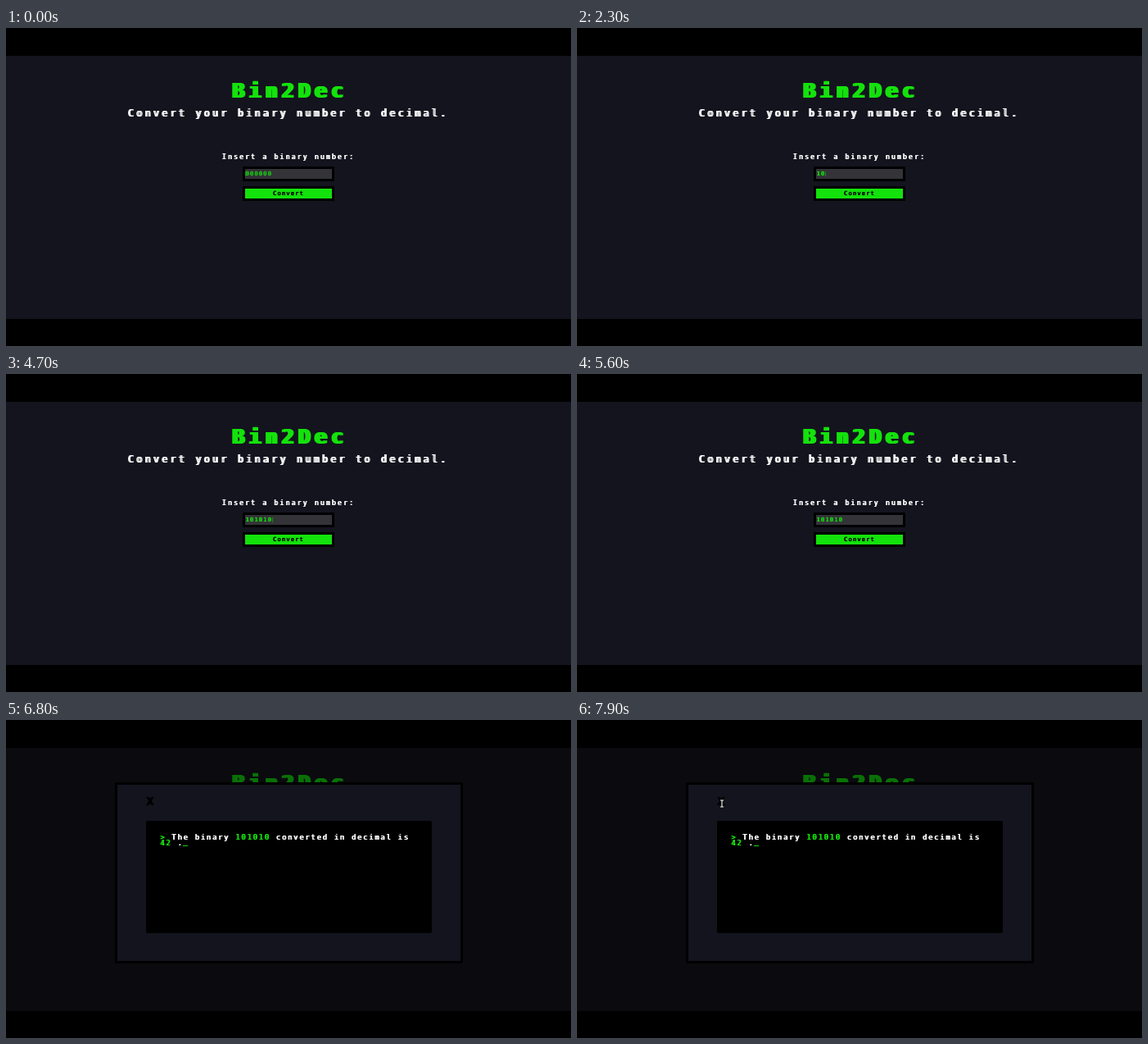
Write an HTML page that moves like this. It is 690 px wide and 388 px high and loops after 8000 ms.

```html
<!DOCTYPE html>
<html lang="en">
<head>
<meta charset="utf-8">
<title>Binary converter</title>
<style>
html, body { margin: 0; width: 100%; height: 100%; overflow: hidden; background: #000; }
#stage { position: relative; width: 690px; height: 388px; overflow: hidden; }
#stage div, svg { position: absolute; box-sizing: border-box; }
#page, #overlay { left: 0; top: 34px; width: 690px; height: 321px; }
#page { background: #14141f; }
#overlay { background: rgba(0, 0, 0, .5); }

/* Wide terminal lettering: each glyph is centred in a cell of --pitch, and
   sideways shadows thicken the upright strokes. top marks the cap middle. */
.t {
  --gap: calc(var(--pitch) - .602em);
  --pitch: 7.09px;
  --thick: .5px;
  font: 8.7px/0 "DejaVu Sans Mono", monospace;
  letter-spacing: var(--gap);
  padding-left: calc(var(--gap) / 2);
  white-space: pre;
  color: #fff;
  text-shadow: var(--thick) 0, calc(-1 * var(--thick)) 0;
}
.g { color: #14e20c; }
#title { left: 274px; top: 77px; font-size: 25px; font-weight: bold; --pitch: 20.1px; --thick: 1.7px; }
#lead { left: 147.5px; top: 104px; font-size: 11.5px; --pitch: 10.3px; --thick: .9px; }
#label { left: 263px; top: 158px; font-size: 8px; --pitch: 7.05px; }
.small { font-size: 7px; --pitch: 5.42px; --thick: .3px; }
#value { left: 292px; top: 177.8px; }
#button { left: 325.5px; top: 202px; color: #000; }
.box { left: 289px; width: 112px; height: 18px; border: 3px solid #000; border-radius: 1px; }
#caret { top: 175px; width: 1px; height: 6px; background: #168c18; }
#modal { left: 133px; top: 76px; width: 425px; height: 221px; border: 3px solid #000; border-radius: 2px; background: #14141f; }
#term { left: 171px; top: 123px; width: 349px; height: 137px; border-radius: 2px; background: #000; }
#close { left: 170px; top: 99px; font-size: 14px; --pitch: 12px; --thick: 1px; color: #000; }
#blink { left: 216px; top: 152.5px; width: 6px; height: 1.5px; background: #14e20c; }
svg { left: 0; top: 0; overflow: visible; }
</style>
</head>
<body>
<div id="stage">
  <div id="page"></div>
  <div id="title" class="t g">Bin2Dec</div>
  <div id="lead" class="t">Convert your binary number to decimal.</div>
  <div id="label" class="t">Insert a binary number:</div>
  <div class="box" style="top:169px;background:#343338"></div>
  <div id="value" class="t small"></div>
  <div id="caret"></div>
  <div class="box" style="top:193px;background:#14e20c"></div>
  <div id="button" class="t small">Convert</div>
  <div id="result">
    <div id="overlay"></div>
    <div id="modal"></div>
    <div id="close" class="t">X</div>
    <div id="term"></div>
    <div class="t" style="left:187.5px;top:143px"><span class="g">&gt;</span> The binary <span class="g">101010</span> converted in decimal is</div>
    <div class="t" style="left:187.5px;top:150px"><span class="g">42</span> .</div>
    <div id="blink"></div>
    <svg id="mouse" width="1" height="1">
      <path id="arrow" d="M0 0V9L2 7.2L3.5 10.5L5 9.8L3.6 6.6H6.4Z" fill="#000" stroke="#fff" stroke-width=".7"/>
      <g id="beam" fill="none">
        <path d="M-2-4H2M0-4V4M-2 4H2" stroke="#000" stroke-width="2.6"/>
        <path d="M-2-4H2M0-4V4M-2 4H2" stroke="#fff" stroke-width="1.1"/>
      </g>
    </svg>
  </div>
</div>
<script>
const $ = id => document.getElementById(id);
const show = (id, on) => { $(id).style.display = on ? "" : "none"; };
const LOOP = 8000, digits = "101010", keys = [1500, 2300, 2900, 3500, 4100, 4700];

function draw(now) {
  const t = Math.floor(now % LOOP / 100) * 100;

  const typed = keys.filter(k => t >= k).length;
  $("value").textContent = typed ? digits.slice(0, typed) : "000000";
  $("value").style.color = typed ? "#16d810" : "#18c414";
  $("caret").style.left = 292 + 5.42 * typed + "px";
  show("caret", t < 700 || t >= 1500 && t < 2100 || t >= 2300 && t < 5300);

  show("result", t >= 5800);
  $("blink").style.opacity = .5 + .5 * Math.cos((t - 5850) / 1050 * 2 * Math.PI);

  // The pointer glides to the close mark and turns into a text beam there.
  const p = Math.min(1, Math.max(0, (t - 7100) / 700));
  const ease = 1 - (1 - p) ** 2;
  $("mouse").style.transform = `translate(${57 + 120 * ease}px, ${220 - 118 * ease}px)`;
  show("mouse", t >= 7100);
  show("arrow", t < 7700);
  show("beam", t >= 7700);
}

const start = performance.now();
function tick() {
  draw(performance.now() - start);
  requestAnimationFrame(tick);
}
tick();
</script>
</body>
</html>
```
